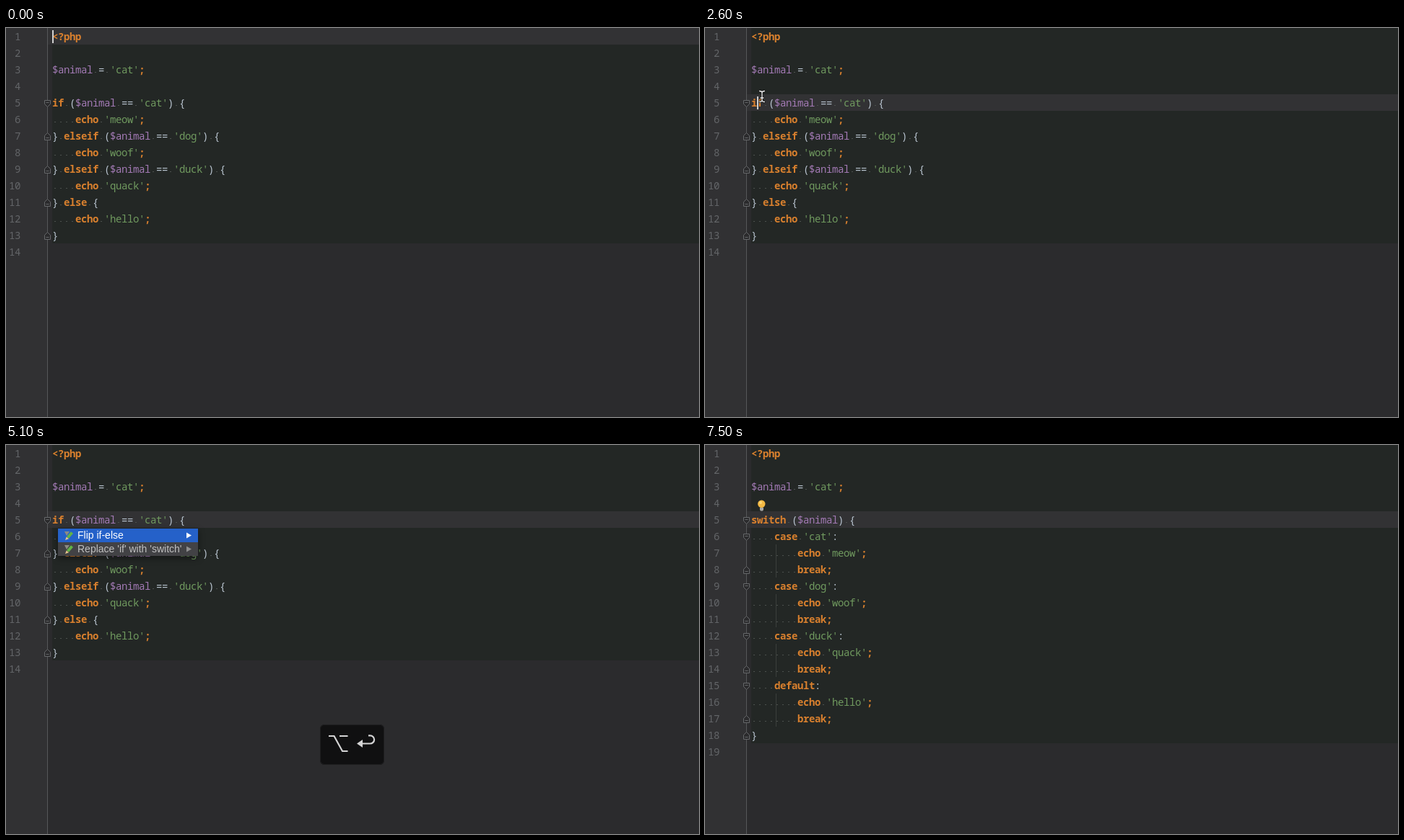
An HTML page that plays this animation: 960x540 px, repeating every 8000 ms.

```html
<!DOCTYPE html>
<html lang="en">
<head>
<meta charset="utf-8">
<title>Replace if with switch</title>
<style>
  html, body { margin: 0; width: 100%; height: 100%; overflow: hidden; background: #2b2b2d; }
  #stage { position: absolute; left: 0; top: 0; width: 960px; height: 540px; overflow: hidden; }
  #stage > *, .line, .num, .guide { position: absolute; }
  .code, svg { left: 0; top: 0; width: 960px; height: 540px; }
  .code { font: 14px/23px "Noto Sans Mono", monospace; letter-spacing: -.4px; color: #bac5d1; white-space: pre; }
  .line { left: 64px; height: 23px; }
  .num { left: 0; width: 20px; text-align: right; color: #636568; }
  .guide { left: 98px; width: 1px; height: 46px; background: #3b3f3c; }
  .key { color: #d9802e; font-weight: bold; }
  .var { color: #a37ab5; }
  .str { color: #709a5f; }
  .gap {
    display: inline-block; height: 23px; vertical-align: top;
    background: radial-gradient(circle at 4px 15.5px, #4c514e .7px, transparent 1.1px) 0 0 / 8px 23px;
  }
  #php { left: 64px; top: 0; right: 0; height: 299px; background: #232725; }
  #row { left: 58px; top: 0; right: 0; height: 23px; background: #323234; }
  #gutter { left: 0; top: 0; width: 57px; height: 540px; background: #313133; border-right: 1px solid #565759; }
  #caret { left: 64px; top: 3px; width: 2px; height: 18px; background: #d0d0d0; }
  #menu {
    left: 72px; top: 116px; width: 194px; height: 38px; background: #424245;
    box-shadow: 0 3px 9px rgba(0,0,0,.45); font: 14px/19px "Liberation Sans", Arial, sans-serif; color: #c0c0c0;
  }
  .item { position: relative; height: 19px; padding-left: 27px; white-space: pre; }
  .lit { position: absolute; left: 0; top: 0; width: 194px; color: #fff; }
  .lit .item { background: #2561c9; }
  .item svg { position: absolute; width: 194px; height: 19px; }
  #keys {
    left: 435px; top: 388px; width: 89px; height: 56px; border-radius: 6px;
    background: #0a0a0b; box-shadow: inset 0 0 0 1px #1b1b1c;
  }
  #keys svg { width: 89px; height: 56px; }
</style>
</head>
<body>
<div id="stage">
  <div id="php"></div>
  <div id="row"></div>
  <div id="gutter"></div>
  <div id="before" class="code"></div>
  <div id="after" class="code"></div>
  <svg id="foldsBefore"></svg>
  <svg id="foldsAfter"></svg>
  <div id="caret"></div>
  <svg id="bulb">
    <circle cx="78.3" cy="81.7" r="5.2" fill="#f3b944"/>
    <circle cx="77" cy="80" r="2" fill="#ffd878"/>
    <path d="M76 87h5v3l-1 1.5h-3l-1-1.5z" fill="#a9a9a9"/>
  </svg>
  <div id="menu"></div>
  <div id="keys">
    <svg fill="none" stroke="#fff" stroke-width="2.2">
      <path d="M12 16h7.5L31 37h7.5M27 16h11.5M58 26.5H69.5a5.6 5.6 0 0 0 0-11.2H67"/>
      <path d="M51 26.5l8-5.5v11z" fill="#fff" stroke="none"/>
    </svg>
  </div>
  <svg id="pointer" style="width:20px;height:20px">
    <g fill="none" stroke-linecap="round">
      <path id="beam" d="M6.5 2.5Q10 2.5 10 5Q10 2.5 13.5 2.5M10 5V15M6.5 17.5Q10 17.5 10 15Q10 17.5 13.5 17.5M8 12H12" stroke="#151515" stroke-width="3"/>
      <use href="#beam" style="stroke:#fff"/>
      <path d="M6.5 2.5Q10 2.5 10 5Q10 2.5 13.5 2.5M10 5V15M6.5 17.5Q10 17.5 10 15Q10 17.5 13.5 17.5M8 12H12" stroke="#f2f2f2" stroke-width="1.3"/>
    </g>
  </svg>
</div>
<script>
const LOOP = 8000, LINE = 23;
const $ = id => document.getElementById(id);

const head = `<?php

$animal = 'cat';

`;
const ifCode = head + `if ($animal == 'cat') {
    echo 'meow';
} elseif ($animal == 'dog') {
    echo 'woof';
} elseif ($animal == 'duck') {
    echo 'quack';
} else {
    echo 'hello';
}
`;
const branch = (label, sound) => `    ${label}:
        echo '${sound}';
        break;
`;
const switchCode = head + `switch ($animal) {
` + branch("case 'cat'", 'meow') + branch("case 'dog'", 'woof') +
  branch("case 'duck'", 'quack') + branch('default', 'hello') + `}
`;

const TOKEN = /(?<gap> +)|(?<str>'[^']*')|(?<var>\$\w+)|(?<key><\?php|\b(?:if|elseif|else|echo|switch|case|break|default)\b|;)|./g;

function highlight(line) {
  return line.replace(TOKEN, (text, ...rest) => {
    const kind = Object.entries(rest.at(-1)).find(entry => entry[1])?.[0];
    const safe = text.replace('<', '&lt;');
    return kind ? `<span class="${kind}">${safe}</span>` : safe;
  });
}

function showCode(el, code, guides = []) {
  el.innerHTML = code.split('\n').map((line, i) => {
    const top = `style="top:${i * LINE}px"`;
    return `<div class="num" ${top}>${i + 1}</div><div class="line" ${top}>${highlight(line)}</div>`;
  }).join('') + guides.map(n => `<div class="guide" style="top:${(n - 1) * LINE}px"></div>`).join('');
}

function showFolds(el, starts, ends) {
  const mark = (n, shape) =>
    `<path transform="translate(53.5 ${(n - 1) * LINE})" d="${shape}" fill="#2b2b2d" stroke="#66686a"/>`;
  el.innerHTML =
    starts.map(n => mark(n, 'M0 8.5H8V13.5L4 17.5L0 13.5ZM2 11.5H6')).join('') +
    ends.map(n => mark(n, 'M0 17.5H8V11.5L4 7.5L0 11.5ZM2 14.5H6')).join('');
}

const item = (label, arrow) => `<div class="item"><svg>
  <path d="M9 4H16L12 10Z" fill="#8d8b83"/>
  <path d="M19.5 5.5L13.5 12.5" stroke="#62b345" stroke-width="4"/>
  <path d="M11.7 11.4L15 14.2L10 16Z" fill="#e9c58c"/>
  <path d="M178 5.5L185 9.5L178 13.5Z" fill="${arrow}"/></svg>${label}</div>`;
const labels = ['Flip if-else', "Replace 'if' with 'switch'"];

showCode($('before'), ifCode);
showCode($('after'), switchCode, [7, 10, 13, 16]);
showFolds($('foldsBefore'), [5], [7, 9, 11, 13]);
showFolds($('foldsAfter'), [5, 6, 9, 12, 15], [8, 11, 14, 17, 18]);
$('beam').nextElementSibling.remove();
$('menu').innerHTML = labels.map(label => item(label, '#8f8f8f')).join('') +
  labels.map((label, i) => `<div class="lit" id="lit${i}" style="top:${i * 19}px">${item(label, '#fff')}</div>`).join('');

// Holds each value from its time until the next one.
function hold(id, prop, steps) {
  const frames = steps.map(([time, value]) => ({ offset: time / LOOP, [prop]: value, easing: 'steps(1, end)' }));
  frames.push({ offset: 1, [prop]: steps.at(-1)[1] });
  $(id).animate(frames, { duration: LOOP, iterations: Infinity });
}
const blink = (id, first, ...times) =>
  hold(id, 'opacity', [[0, first], ...times.map((time, i) => [time, (first + i + 1) % 2])]);
const move = (x, y) => `translate(${x}px, ${y}px)`;

blink('caret', 1, 200, 700, 1200, 1700, 2700, 3200, 3600, 6600, 7500);
hold('caret', 'transform', [[0, move(0, 0)], [2200, move(8, 4 * LINE)]]);
hold('row', 'transform', [[0, move(0, 0)], [2200, move(0, 4 * LINE)]]);
hold('php', 'height', [[0, '299px'], [6600, '414px']]);

blink('before', 1, 6600);
blink('after', 0, 6600);
blink('foldsBefore', 1, 6600);
blink('foldsAfter', 0, 6900);
blink('bulb', 0, 7300);
blink('menu', 0, 4000, 6500);
blink('lit0', 1, 5300);
blink('lit1', 0, 5300);

const fade = [1, 2, 3, 4, 5];
hold('keys', 'opacity', [[0, 0],
  ...fade.map(n => [3800 + n * 100, n / 5]),
  ...fade.map(n => [5000 + n * 100, 1 - n / 5])]);

const arrive = [[271, 8], [224, 34], [175, 55], [142, 71], [117, 83], [99, 92], [87, 98], [79, 101], [75, 103], [72, 104], [71, 104]];
const leave = [[79, 95], [85, 89], [90, 83], [95, 78], [99, 74], [101, 72], [102, 71]];
const path = (start, points) => points.map(([x, y], i) => [start + i * 100, move(x - 10, y - 10)]);
hold('pointer', 'transform', [[0, move(261, -2)], ...path(1000, arrive), ...path(2600, leave)]);
blink('pointer', 0, 1000, 3900);
</script>
</body>
</html>
```
